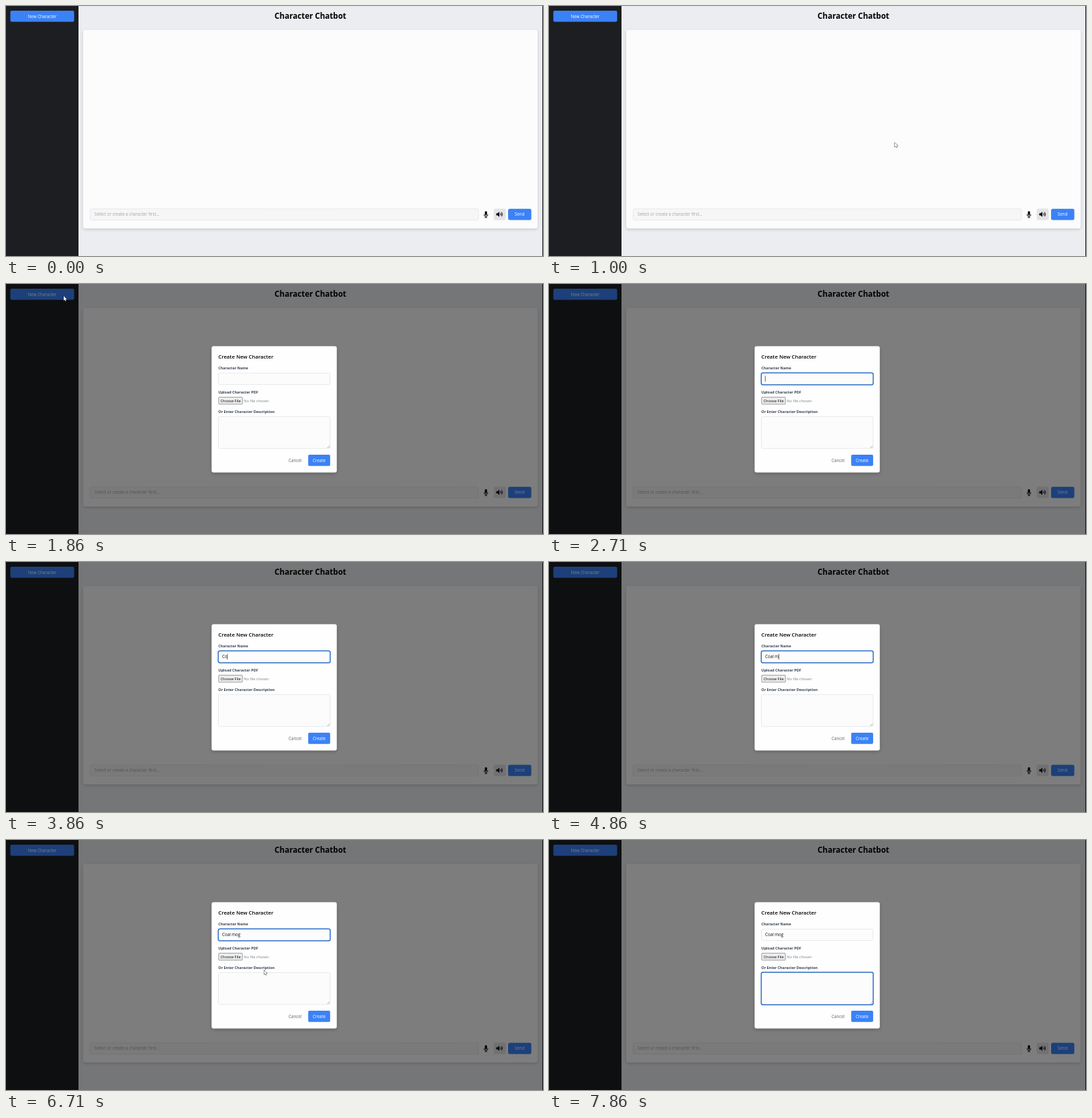
These frames come from a looping animation (800x372 px, 8000 ms). An HTML page with a canvas:

```html
<!DOCTYPE html>
<html lang="en">
<head>
<meta charset="utf-8">
<title>Character Chatbot</title>
<style>
  html, body { margin: 0; width: 100%; height: 100%; overflow: hidden; background: #ecedf1; }
  canvas { display: block; width: 800px; height: 372px; }
</style>
</head>
<body>
<canvas id="stage" width="800" height="372"></canvas>
<script>
const ctx = document.getElementById('stage').getContext('2d');
const LOOP = 8000;
const FONT = '"Open Sans", "Noto Sans", sans-serif';
const BLUE = '#3b82f6';
const NAME = 'Coal mog';

const MODAL_AT = 1860, NAME_FOCUS = 2570, AREA_FOCUS = 7000;
// Time at which each letter of the name appears.
const KEYS = [3710, 3860, 4000, 4140, 4430, 4860, 5710, 5860];
// Spans in which a text caret is lit.
const CARET = [[2570, 3290], [3710, 5140], [5570, 6430], [7000, 7570]];
// Pointer path: time, x, y, shape.
const POINTER = [
  [1000, 515, 203, 'arrow'], [1140, 400, 150, 'arrow'], [1290, 225, 70, 'arrow'],
  [1430, 105, 24, 'arrow'], [1570, 86, 18, 'hand'], [1860, 86, 18, 'arrow'],
  [2140, 100, 26, 'arrow'], [2290, 190, 72, 'arrow'], [2430, 310, 124, 'arrow'],
  [2570, 368, 141, 'beam'], [2710, 0, 0, ''],
  [6430, 370, 141, 'beam'], [6570, 378, 168, 'arrow'], [6710, 384.5, 193.5, 'arrow'],
  [6860, 388, 216, 'beam'], [7430, 0, 0, '']
];

function box(x, y, w, h, r, fill, stroke, line = 0.7) {
  ctx.beginPath();
  ctx.roundRect(x, y, w, h, r);
  if (fill) { ctx.fillStyle = fill; ctx.fill(); }
  if (stroke) { ctx.strokeStyle = stroke; ctx.lineWidth = line; ctx.stroke(); }
}

// y is the middle of the capitals.
function text(str, x, y, size, color, weight = 400, align = 'left') {
  ctx.font = `${weight} ${size}px ${FONT}`;
  ctx.textAlign = align;
  ctx.fillStyle = color;
  ctx.fillText(str, x, y + size * 0.36);
}

function shadowed(blur, dy, color, draw) {
  ctx.save();
  ctx.shadowBlur = blur;
  ctx.shadowOffsetY = dy;
  ctx.shadowColor = color;
  draw();
  ctx.restore();
}

function shape(points, fill, stroke, line) {
  ctx.beginPath();
  points.forEach(([x, y]) => ctx.lineTo(x, y));
  ctx.closePath();
  if (stroke) { ctx.strokeStyle = stroke; ctx.lineWidth = line; ctx.stroke(); }
  ctx.fillStyle = fill;
  ctx.fill();
}

function mic(x, y) {
  box(x - 1.6, y - 5, 3.2, 6.4, 1.6, '#000');
  ctx.strokeStyle = '#000';
  ctx.lineWidth = 0.9;
  ctx.beginPath();
  ctx.arc(x, y - 0.2, 3, 0, Math.PI);
  ctx.moveTo(x, y + 2.8);
  ctx.lineTo(x, y + 4.6);
  ctx.moveTo(x - 1.9, y + 4.6);
  ctx.lineTo(x + 1.9, y + 4.6);
  ctx.stroke();
}

function speaker(x, y) {
  shape([[x - 4.6, y - 1.4], [x - 2.8, y - 1.4], [x, y - 3.7], [x, y + 3.7],
         [x - 2.8, y + 1.4], [x - 4.6, y + 1.4]], '#000');
  ctx.strokeStyle = '#000';
  ctx.lineWidth = 0.8;
  for (const r of [1.5, 2.9, 4.3]) {
    ctx.beginPath();
    ctx.arc(x + 0.3, y, r, -0.9, 0.9);
    ctx.stroke();
  }
}

function page(hover) {
  ctx.fillStyle = '#ecedf1';
  ctx.fillRect(0, 0, 800, 372);
  ctx.fillStyle = '#1c1e22';
  ctx.fillRect(0, 0, 108, 372);
  ctx.fillRect(799, 0, 1, 372);

  box(6.5, 7, 95, 16.5, 2, hover ? '#2563eb' : BLUE);
  text('New Character', 54, 15.3, 6.23, '#fff', 400, 'center');
  text('Character Chatbot', 453.5, 14.8, 11.6, '#000', 700, 'center');

  shadowed(4, 1.5, 'rgba(0,0,0,.16)', () => box(115, 35.5, 677, 295.5, 3, '#fcfcfc'));
  box(125.3, 301.8, 578.4, 16.8, 2, '#f6f6f7', '#e1e2e5');
  text('Select or create a character first...', 132, 310.2, 6.23, '#a2a4a8');
  mic(715, 310.2);
  box(726.5, 301.5, 18, 17, 2.5, '#e3e4e8');
  speaker(735, 310);
  box(748, 301.8, 34.6, 16.6, 2.5, BLUE);
  text('Send', 765.2, 310.2, 6.3, '#fff', 400, 'center');
}

function field(x, y, w, h, focused) {
  box(x, y, w, h, 2, '#fcfcfc', '#dfe1e5');
  if (focused) box(x - 0.2, y - 0.5, w + 0.4, h + 1, 2.5, null, '#3172c6', 1.5);
}

function modal(t) {
  ctx.fillStyle = 'rgba(0,0,0,.5)';
  ctx.fillRect(0, 0, 800, 372);
  shadowed(5, 2, 'rgba(0,0,0,.2)', () => box(306.3, 92.5, 186.5, 188, 3, '#fefefe'));
  text('Create New Character', 316.3, 108.6, 7.75, '#000', 600);

  const inArea = t >= AREA_FOCUS;
  const typed = NAME.slice(0, KEYS.filter(k => t >= k).length);
  const label = (s, y) => text(s, 316.3, y, 5.45, '#374151', 700);

  label('Character Name', 125);
  field(316.4, 132.7, 166.4, 16.8, t >= NAME_FOCUS && !inArea);
  text(typed, 322, 141.2, 6.23, '#111');
  const end = 322 + ctx.measureText(typed).width;

  label('Upload Character PDF', 160.7);
  box(316.8, 168.4, 35.4, 10.4, 0.8, '#ededed', '#777');
  text('Choose File', 334.5, 173.6, 5.65, '#000', 400, 'center');
  text('No file chosen', 354.3, 173.6, 5.65, '#7c7f84');

  label('Or Enter Character Description', 189.8);
  field(316.4, 197.3, 166.4, 47.4, inArea);
  ctx.strokeStyle = '#777';
  ctx.lineWidth = 0.5;
  ctx.beginPath();
  for (const d of [1.6, 3.6]) {
    ctx.moveTo(482 - d, 244);
    ctx.lineTo(482, 244 - d);
  }
  ctx.stroke();

  text('Cancel', 430.7, 262.7, 6.3, '#5d626b', 400, 'center');
  box(450.2, 254, 32.7, 16.8, 1.8, BLUE);
  text('Create', 466.5, 262.7, 6.3, '#fff', 400, 'center');

  if (CARET.some(([on, off]) => t >= on && t < off)) {
    ctx.fillStyle = '#222';
    if (inArea) ctx.fillRect(321.7, 202, 0.7, 8.5);
    else ctx.fillRect(end - 0.2, 136.7, 0.7, 8.5);
  }
}

const DRAW = {
  arrow() {
    shape([[0, 0], [0, 6.6], [1.5, 5.3], [2.6, 7.6], [3.6, 7.1], [2.6, 4.9], [4.6, 4.8]],
      '#fff', '#222', 0.9);
  },
  hand() {
    shape([[0.2, 0.8], [1.1, 0.8], [1.5, 3.4], [4.4, 4], [4.7, 5.2], [4.1, 8.6],
           [0.9, 8.6], [-1.4, 5.8], [-0.9, 5.1], [0.3, 5.8]], '#fff', '#111', 0.8);
  },
  beam() {
    ctx.strokeStyle = '#444';
    ctx.lineWidth = 0.6;
    ctx.beginPath();
    ctx.moveTo(-1.2, -3.5); ctx.lineTo(1.2, -3.5);
    ctx.moveTo(0, -3.5); ctx.lineTo(0, 3.5);
    ctx.moveTo(-1.2, 3.5); ctx.lineTo(1.2, 3.5);
    ctx.stroke();
  }
};

function pointer(t) {
  const at = POINTER.findLast(p => t >= p[0]);
  if (!at || !at[3]) return;
  ctx.save();
  ctx.translate(at[1], at[2]);
  DRAW[at[3]]();
  ctx.restore();
}

function frame() {
  const t = performance.now() % LOOP;
  page(t >= 1570 && t < MODAL_AT);
  if (t >= MODAL_AT) modal(t);
  pointer(t);
  requestAnimationFrame(frame);
}
frame();
</script>
</body>
</html>
```
